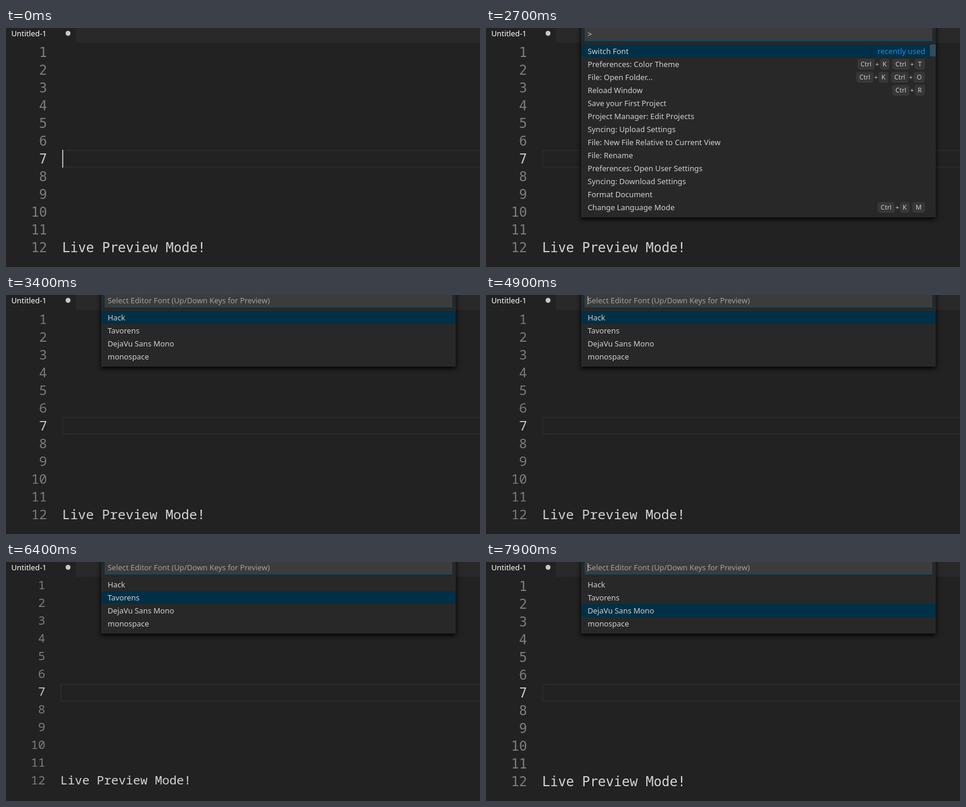
An HTML page with a canvas that plays this animation: 802 px wide and 404 px high, repeating every 8000 ms.

```html
<!DOCTYPE html>
<html lang="en">
<head>
<meta charset="utf-8">
<title>Switch Font</title>
<style>
  html, body { margin: 0; width: 100%; height: 100%; overflow: hidden; background: #222; }
  canvas { display: block; }
</style>
</head>
<body>
<canvas id="stage" width="802" height="404"></canvas>
<script>
const ctx = document.getElementById('stage').getContext('2d');
const LOOP = 8000;
const UI = '12.8px "Noto Sans", sans-serif';
const KEY = '11px "Noto Sans", sans-serif';

// Editor looks: font, left edge of the text, right edge of the numbers, first baseline
const DEJAVU = { font: '22.4px "DejaVu Sans Mono", monospace', left: 95, gutter: 69.5, base: 49 };
const HACK = { ...DEJAVU, font: '22.4px "Noto Sans Mono", monospace' };
const NARROW = { font: '20.5px "Noto Sans Mono", monospace', left: 92, gutter: 66.5, base: 46 };

const COMMANDS = [
  ['Switch Font'],
  ['Preferences: Color Theme', 'Ctrl+K Ctrl+T'],
  ['File: Open Folder...', 'Ctrl+K Ctrl+O'],
  ['Reload Window', 'Ctrl+R'],
  ['Save your First Project'],
  ['Project Manager: Edit Projects'],
  ['Syncing: Upload Settings'],
  ['File: New File Relative to Current View'],
  ['File: Rename'],
  ['Preferences: Open User Settings'],
  ['Syncing: Download Settings'],
  ['Format Document'],
  ['Change Language Mode', 'Ctrl+K M']
];
const FONTS = [['Hack'], ['Tavorens'], ['DejaVu Sans Mono'], ['monospace']];
const KEY_WIDTH = { Ctrl: 30, K: 17, T: 18, O: 20, R: 18, M: 22 };

function rect(x, y, w, h, color) {
  ctx.fillStyle = color;
  ctx.fillRect(x, y, w, h);
}

function text(str, x, y, color, font = UI, align = 'left') {
  ctx.font = font;
  ctx.textAlign = align;
  ctx.fillStyle = color;
  ctx.fillText(str, x, y);
}

function drawEditor(look, caret) {
  rect(0, 0, 802, 404, '#222');
  rect(118, 0, 684, 25, '#292929');
  text('Untitled-1', 9, 14, '#fff');
  ctx.fillStyle = '#c8c8c8';
  ctx.beginPath();
  ctx.arc(105, 9, 4.2, 0, Math.PI * 2);
  ctx.fill();

  ctx.strokeStyle = '#2b2b2b';
  ctx.lineWidth = 2;
  ctx.strokeRect(look.left + 1, 207, 720, 28);
  for (let n = 1; n <= 12; n++) {
    const color = n === 7 ? '#c8c8c8' : '#7c7c7c';
    text(n, look.gutter, look.base + (n - 1) * 30, color, look.font, 'right');
  }
  text('Live Preview Mode!', look.left, look.base + 330, '#d4d4d4', look.font);
  if (caret) rect(look.left, 206, 2, 30, '#aeafad');
}

function drawKey(label, right, mid) {
  const w = KEY_WIDTH[label];
  ctx.beginPath();
  ctx.roundRect(right - w + .5, mid - 8.5, w - 1, 17, 3);
  ctx.fillStyle = '#373737';
  ctx.fill();
  ctx.strokeStyle = '#333';
  ctx.lineWidth = 1;
  ctx.stroke();
  rect(right - w + 3, mid + 8, w - 6, 1, '#414141');
  text(label, right - w / 2, mid + 4, '#ccc', KEY, 'center');
  return right - w;
}

// Key chords are laid out from the right edge
function drawShortcut(chords, mid) {
  let x = 743;
  for (const chord of chords.split(' ').reverse()) {
    chord.split('+').reverse().forEach((label, i) => {
      if (i) {
        text('+', x - 4, mid + 4, '#ccc', KEY, 'center');
        x -= 8;
      }
      x = drawKey(label, x, mid);
    });
    x -= 4;
  }
}

function drawPicker(items, top, selected) {
  ctx.save();
  ctx.shadowColor = '#000';
  ctx.shadowBlur = 8;
  ctx.shadowOffsetY = 3;
  rect(161, -10, 600, top + items.length * 22 + 16, '#282828');
  ctx.restore();

  rect(167, -2, 588, top - 4, '#0b4f6c');
  rect(168, -2, 586, top - 5, '#3c3c3c');
  rect(161, top + selected * 22, 600, 22, '#003047');
  items.forEach(([label, chords], i) => {
    const mid = top + 11 + i * 22;
    text(label, 172, mid + 5, '#d0d0d0');
    if (chords) drawShortcut(chords, mid);
  });
}

function drawCommands(t) {
  drawPicker(COMMANDS, 28, 0);
  text('>', 172, 15, '#ccc');
  text('recently used', 743, 44, '#1c8ce6', UI, 'right');
  rect(751, 28, 10, 20, `rgba(121,121,121,${t < 1400 ? .2 : .4})`);
  if (t < 1700 || t >= 2200 && t < 2700) rect(179, 3, 1, 14, '#ccc');
}

function drawFonts(t) {
  drawPicker(FONTS, 27, t < 5200 ? 0 : t < 6600 ? 1 : 2);
  text('Select Editor Font (Up/Down Keys for Preview)', 172, 14, '#a0a0a0');
  // Blink restarts after the second arrow key
  const blinkStart = t < 6800 ? 2900 : 6900;
  const caretOn = t < blinkStart || Math.floor((t - blinkStart) / 500) % 2 === 0;
  if (caretOn) rect(172, 2, 1, 14, '#ccc');
}

function editorLook(t) {
  if (t < 3000 || t >= 6700) return DEJAVU;
  return t < 5300 ? HACK : NARROW;
}

function frame(now) {
  const t = now % LOOP;
  drawEditor(editorLook(t), t < 1200);
  if (t >= 2800) drawFonts(t);
  else if (t >= 1200) drawCommands(t);
  requestAnimationFrame(frame);
}
requestAnimationFrame(frame);
</script>
</body>
</html>
```
